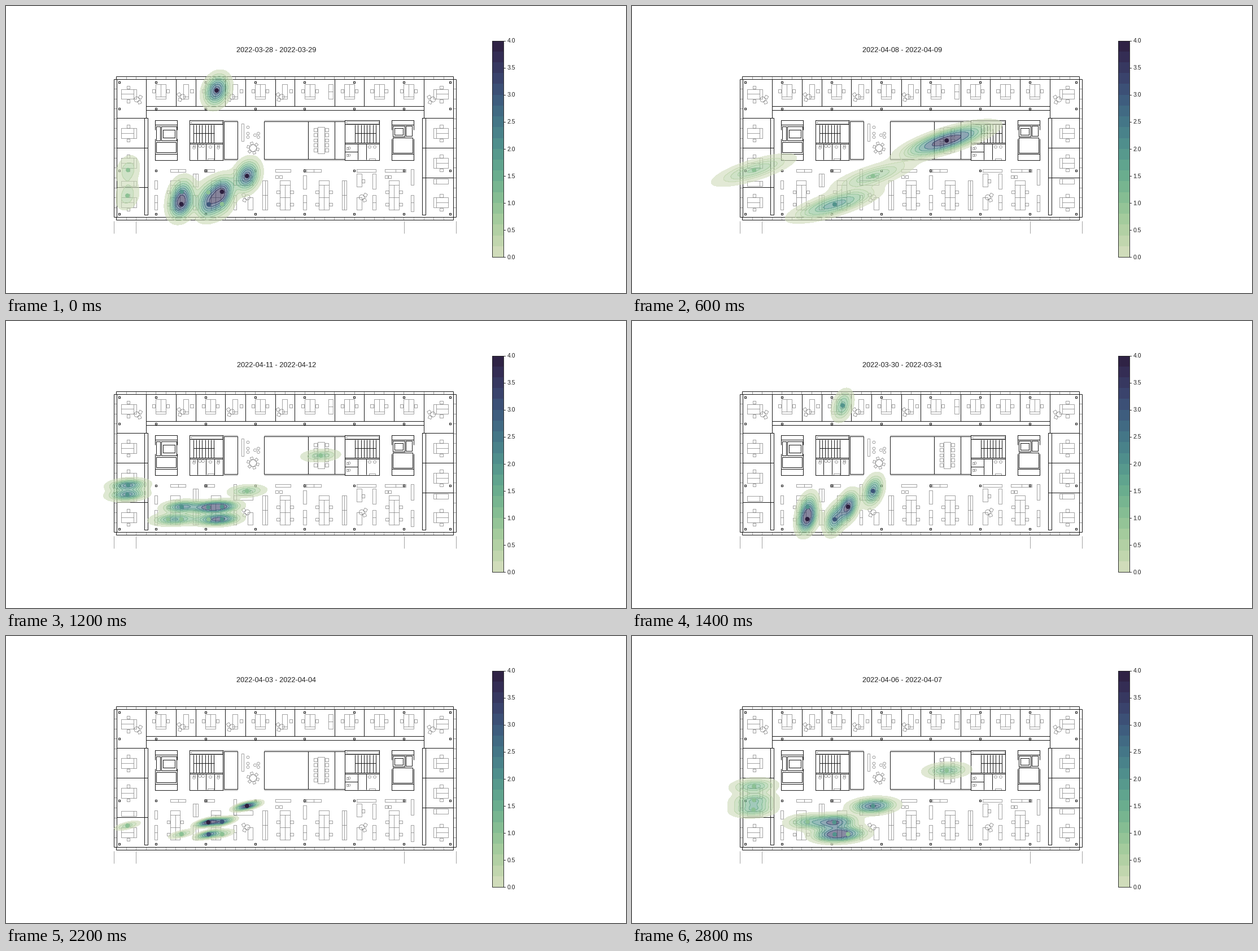
Write a matplotlib script that moves like this. It is 1098 px wide and 510 px high and loops after 3 s.

```python
import numpy as np
import matplotlib.pyplot as plt
from matplotlib.animation import FuncAnimation
from matplotlib.collections import LineCollection
from matplotlib.colors import LinearSegmentedColormap
from matplotlib.patches import Circle, Rectangle

W, H, DPI = 1098, 510, 128  # power-of-two dpi keeps the pixel size exact
PT = 72 / DPI
INK = "0.12"

plt.rcParams["font.family"] = ["Liberation Sans", "DejaVu Sans"]
fig = plt.figure(figsize=(W / DPI, H / DPI), dpi=DPI, facecolor="white")
ax = fig.add_axes([0, 0, 1, 1])
ax.set(xlim=(0, W), ylim=(H, 0))
ax.axis("off")
ax.autoscale(False)


def helix(n=256, start=0.5, rot=-0.75, hue=0.8, light=0.85, dark=0.15):
    x = np.linspace(light, dark, n)
    phi = 2 * np.pi * (start / 3 + rot * x)
    amp = hue * x * (1 - x) / 2
    c, s = np.cos(phi), np.sin(phi)
    rgb = [x + amp * (p * c + q * s) for p, q in
           ((-0.14861, 1.78277), (-0.29227, -0.90649), (1.97294, 0))]
    return LinearSegmentedColormap.from_list("helix", np.clip(np.transpose(rgb), 0, 1), n)


CMAP = helix()

# ---- floor plan -----------------------------------------------------------
walls, thin = [], []


def line(x0, y0, x1, y1, to=walls):
    to.append([(x0, y0), (x1, y1)])


def box(x0, y0, x1, y1, to=thin):
    to.append([(x0, y0), (x1, y0), (x1, y1), (x0, y1), (x0, y0)])


def square(x, y, size=5.5, angle=0, to=thin):
    a = np.radians(angle + 45 + 90 * np.arange(5))
    r = size / np.sqrt(2)
    to.append(list(zip(x + r * np.cos(a), y + r * np.sin(a))))


def ring(x, y, r=2.4):
    ax.add_patch(Circle((x, y), r, fill=False, ec="0.4", lw=0.6 * PT, zorder=1))


def round_table(x, y, side):
    ring(x, y, 4.6)
    square(x + side * 6.5, y - 4, 5.5, 30 * side)
    square(x + side * 5, y + 5, 5.5, -20 * side)


def facade():
    for y in (125, 379.5):
        line(195, y, 792, y)
    for y in (130, 374.5):
        line(191, y, 797, y)
    for x in (191, 196, 792, 797):
        line(x, 130, x, 374.5)
    for x in (195, 792):
        line(x, 125, x, 130)
        line(x, 374.5, x, 379.5)
    for x in 212.5 + 17.57 * np.arange(33):
        line(x, 125, x, 130, thin)
        line(x, 374.5, x, 379.5, thin)
    for y in 147 + 17.55 * np.arange(13):
        line(191, y, 196, y, thin)
        line(792, y, 797, y, thin)
    for x in (190.5, 230, 704.5, 796.5):
        line(x, 382, x, 404, thin)
    for x in (200.5, 265.3, 353, 441, 528.8, 616.5, 704.5, 786.5):
        for y in (135, 182, 292.5, 369.5):
            square(x, y, 3, to=walls)


def rooms():
    for y in (178, 184.5):
        line(248, y, 739.5, y)
    for x in (300.5, 335.5, 388, 423.5, 476.5, 511, 581.5, 634, 687):
        line(x, 130, x, 178)
    for x in (248, 739.5):
        line(x, 130, x, 199)
    box(245, 199, 251, 371, walls)
    box(737, 199, 743, 371, walls)
    for y in (199, 252, 322):
        line(196, y, 251, y)
    for y in (199, 252, 305):
        line(737, y, 792, y)


def core():
    # lift shafts
    for b in ((264, 203, 303, 211), (266, 214, 273, 239), (275, 214, 302, 239),
              (278, 220, 299, 234), (266, 242, 301, 260), (264, 263, 303, 274),
              (683, 203, 722, 211), (685, 213, 706, 232), (688, 217, 703, 229),
              (708, 213, 719, 231), (685, 234, 720, 261), (683, 263, 722, 274)):
        box(*b, walls)
    for x in (264, 303, 683, 722):
        line(x, 203, x, 220)
        line(x, 236, x, 274)
    # stairs and washrooms
    for x0, x1, s0 in ((325, 384, 331.5), (600, 661, 618)):
        box(x0, 203, x1, 210, walls)
        box(x0 + 3, 204.5, x1 - 1, 208.5, thin)
        box(x0, 245, x1, 273.5, walls)
        line(x0, 243, x1, 243)
        line(x0, 203, x0, 245)
        line(x1, 203, x1, 245)
        line(s0, 226, s0 + 37, 226)
        for x in s0 + 5.25 * np.arange(8):
            line(x, 211, x, 243)
    for x in (338.5, 354, 369):
        line(x, 245, x, 273)
    for x in (623, 638):
        line(x, 245, x, 273)
    line(600, 259, 623, 259)
    for x in (333, 376):
        box(x - 2, 247, x + 2, 250)
        ring(x, 252, 2.2)
    for x, y in ((343.5, 249), (349, 249), (362, 250.5), (644, 250.5), (653, 250.5)):
        ring(x, y)
    for y in (252.5, 265):
        box(603, y - 2, 606, y + 2)
        ring(608, y, 2)
    for x in (357, 643):
        box(x, 270.5, x + 11, 273.5)
    # middle rooms
    box(386, 205, 409.5, 272, walls)
    line(384, 203, 409.5, 203, thin)
    line(384, 273.8, 409.5, 273.8, thin)
    box(456.5, 205, 534.5, 272, walls)
    box(534.5, 205, 581.5, 272, walls)
    box(581.5, 205, 600, 272, walls)
    for y in (203, 273.8):
        line(456.5, y, 600, y, thin)
    box(552, 215, 564, 262)
    for y in (220, 229, 238.5, 247, 256):
        square(548, y)
        square(568, y)
    # lounge
    box(417, 209, 421, 240)
    for x, y in ((428.5, 215.5), (428.5, 226.5), (428.5, 233), (441, 229.5),
                 (447, 226.5), (447, 233)):
        ring(x, y)
    ring(437.5, 252.5, 6)
    for a in np.arange(15, 375, 60):
        square(437.5 + 8.5 * np.cos(np.radians(a)), 252.5 + 8.5 * np.sin(np.radians(a)), 4.5, a)


def office_desks():
    for x in (274, 362, 450, 538, 608, 660.5, 713):
        box(x - 9, 139, x + 9, 165)
        line(x, 139, x, 160.5, thin)
        line(x - 9, 160.5, x + 9, 160.5, thin)
        square(x - 12.5, 151)
        square(x + 12.5, 151)
    for x in (318, 405.5, 493.3):
        box(x - 4.5, 139, x + 4.5, 165)
        line(x - 4.5, 160.5, x + 4.5, 160.5, thin)
        square(x + 11, 151)
        round_table(x - 5, 161.5, -1)
    box(570.5, 139, 579, 165)
    line(570.5, 152, 579, 152, thin)
    for x, side in ((217.5, 1), (770, -1)):
        for y in (156.3, 226, 279, 349):
            box(x - 13.3, y - 8.8, x + 13.3, y + 8.8)
            line(x - 13.3 * side, y, x + 8.5 * side, y, thin)
            line(x + 8.5 * side, y - 8.8, x + 8.5 * side, y + 8.8, thin)
            square(x - side, y - 12)
            square(x - side, y + 12.5)
        round_table(x + 14 * side, 166, side)
    for x, y, s in ((217.5, 315.5, 1), (770, 311.5, -1)):
        box(x - 13.3, y - 4.3, x + 13.3, y + 4.3)
        line(x + 8.5 * s, y - 4.3, x + 8.5 * s, y + 4.3, thin)


def open_space():
    for x in (299.5, 371.3, 494, 563, 687):
        box(x - 8.8, 309.5, x + 8.8, 362)
        line(x - 8.8, 318, x + 8.8, 318, thin)
        line(x, 318, x, 362, thin)
        line(x - 8.8, 340, x + 8.8, 340, thin)
        for dx in (-12.2, 12.2):
            for y in (330.5, 352.3):
                square(x + dx, y)
    for x0, x1 in ((291, 318), (351, 369), (477, 503.5), (527, 558), (621, 655), (671, 708)):
        box(x0, 290, x1, 294.5)
    for x in (304.5, 355.5, 532, 545, 690):
        line(x, 290, x, 294.5, thin)
    for x, y0, y1 in ((265.5, 309.5, 324.5), (265.5, 336, 362), (405.5, 336, 362),
                      (529, 301, 325), (529, 336, 362), (652, 298, 324.5),
                      (652, 336, 362), (719.5, 290, 318), (719.5, 336, 365)):
        box(x - 2.6, y0, x + 2.6, y1)
        if y0 == 336:
            line(x - 2.6, 349, x + 2.6, 349, thin)
    for x, y0, y1 in ((335.5, 298, 321), (335.5, 336, 362), (458.5, 309.5, 362),
                      (599, 309.5, 362)):
        box(x - 4.4, y0, x + 4.4, y1)
        line(x, y0, x, y1, thin)
        if y0 == 309.5:
            line(x - 4.4, 336, x + 4.4, 336, thin)
    box(403, 290, 408, 317.5)
    box(403, 309.5, 437, 317.5)
    for x in (421, 427.5, 434):
        ring(x, 303.5)
    for x in (479.5, 486, 673, 679):
        square(x, 303.5, 5)
    box(428, 340, 437, 362)
    round_table(427.5, 340, -1)
    box(621, 298, 629.5, 321)
    square(632.7, 311)
    box(620.5, 340, 629.5, 362)
    round_table(630, 340, 1)


for part in (facade, rooms, core, office_desks, open_space):
    part()
ax.add_collection(LineCollection(thin, colors="0.4", linewidths=0.6 * PT, zorder=1))
ax.add_collection(LineCollection(walls, colors=INK, linewidths=1.05 * PT, zorder=1.1))

# ---- colour bar -----------------------------------------------------------
X0, X1, TOP, BOTTOM, BANDS = 860.5, 880.5, 61.5, 446, 20
ax.pcolormesh([X0, X1], np.linspace(BOTTOM, TOP, BANDS + 1),
              (np.arange(BANDS)[:, None] + 0.5) / BANDS, cmap=CMAP, vmin=0, vmax=1)
ax.add_patch(Rectangle((X0, TOP), X1 - X0, BOTTOM - TOP, fill=False, ec=INK, lw=0.9 * PT))
for v in np.arange(0, 4.1, 0.5):
    y = BOTTOM - (BOTTOM - TOP) * v / 4
    ax.plot([X1, X1 + 3.8], [y, y], color=INK, lw=0.9 * PT)
    ax.text(X1 + 7, y + 3.8, f"{v:.1f}", fontsize=10.5 * PT, color=INK, va="baseline")

# ---- occupancy ------------------------------------------------------------
SEATS = dict(
    a=(373, 150), b=(216, 267), c=(216, 291.5), d=(215, 308.5), e=(215, 337),
    f=(311, 330), g=(310.5, 352), h=(287, 352.5), i=(358.3, 331), j=(358.8, 352.5),
    k=(382.5, 330), l=(382.5, 352), m=(426.8, 302), n=(557.3, 239))

# day label, then seat letters each followed by hours of use
DAYS = [
    ("03-28", "a4f2g4i1j3k4l1m4c1e1"),
    ("03-29", "a4f2g4i2j3k4l1m3c1e2"),
    ("04-07", "b1c2d1f1h1i2j2l1m2n2"),
    ("04-08", "c1j2m1n4"),
    ("04-09", ""),
    ("04-10", "c2d1f1i2j2l1m2n2"),
    ("04-11", "c2d2f2h1g1i2k2j1l2m1n1"),
    ("03-30", "a2f2g4j3k4m3"),
    ("03-31", "a3g2j3k2"),
    ("04-01", ""),
    ("04-02", ""),
    ("04-03", "m4i4k3j3l1g1e1"),
    ("04-04", "m3i4k3j4l1g1c2n1"),
    ("04-05", "c2d1f1i2j2l1k1m2n1"),
    ("04-06", "b1c1d1f1i2j2l1m2n1"),
]


def density(pts, w, adjust=0.3, cut=3, n=200):
    """Weighted Gaussian kernel density with Scott's bandwidth."""
    w = w / w.sum()
    neff = 1 / np.sum(w ** 2)
    cov = np.cov(pts.T, aweights=w) * (adjust * neff ** (-1 / 6)) ** 2
    pad = cut * np.sqrt(np.diag(cov))
    lo, hi = pts.min(0) - pad, pts.max(0) + pad
    gx, gy = (np.linspace(lo[k], hi[k], n) for k in (0, 1))
    X, Y = np.meshgrid(gx, gy)
    inv = np.linalg.inv(cov)
    Z = np.zeros_like(X)
    for (px, py), wt in zip(pts, w):
        dx, dy = X - px, Y - py
        Z += wt * np.exp(-0.5 * (inv[0, 0] * dx ** 2 + 2 * inv[0, 1] * dx * dy
                                 + inv[1, 1] * dy ** 2))
    return gx, gy, Z


def mass_levels(Z, thresh=0.05, n=10):
    values = np.sort(Z.ravel())[::-1]
    share = np.cumsum(values) / values.sum()
    idx = np.searchsorted(share, 1 - np.linspace(thresh, 1, n))
    return np.take(values, idx, mode="clip")


title = ax.text(479, 82, "", fontsize=12.6 * PT, color=INK, ha="center", va="baseline")
shown = []


def clear():
    while shown:
        shown.pop().remove()
    return []


def draw(n):
    clear()
    day, use = DAYS[n]
    first = np.datetime64("2022-" + day)
    title.set_text(f"{first} - {first + 1}")
    if not use:
        return [title]
    pts = np.array([SEATS[s] for s in use[::2]], float)
    w = np.array([int(v) for v in use[1::2]], float)
    gx, gy, Z = density(pts, w)
    levels = mass_levels(Z)
    style = dict(cmap=CMAP, alpha=0.6, vmin=levels[0], vmax=levels[-1])
    shown.append(ax.contourf(gx, gy, Z, levels, zorder=2, **style))
    shown.append(ax.contour(gx, gy, Z, levels[1:-1], linewidths=0.7 * PT, zorder=2.1, **style))
    shown.append(ax.scatter(*pts.T, c=w, s=(7.8 * PT) ** 2, cmap=CMAP, vmin=0, vmax=4,
                            linewidths=0, zorder=3))
    return [title]


anim = FuncAnimation(fig, draw, frames=len(DAYS), interval=200, init_func=clear,
                     repeat=True, repeat_delay=0, blit=False)
plt.show()
```
